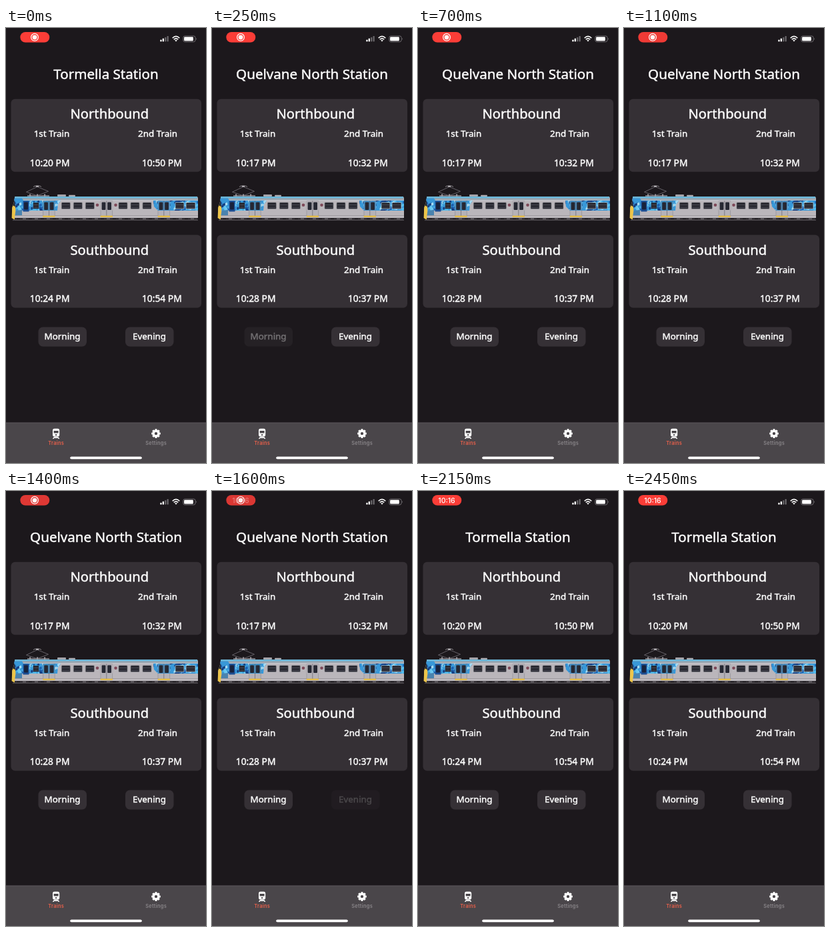
Write an HTML page that moves like this. It is 300 px wide and 648 px high and loops after 2500 ms.

```html
<!DOCTYPE html>
<html lang="en">
<head>
<meta charset="utf-8">
<title>Train times</title>
<style>
  html, body { margin: 0; width: 100%; height: 100%; overflow: hidden; background: #1c181c; }
  svg { display: block; width: 100%; height: 100%; }
  text {
    font-family: "Noto Sans", "Open Sans", sans-serif; font-weight: 500;
    fill: #fff; stroke: #fff; stroke-width: .42px; text-anchor: middle;
  }
  .ui { font-family: Inter, Roboto, sans-serif; font-weight: 600; stroke: none; }
  .title { font-size: 20.6px; }
  .head { font-size: 20.2px; }
  .label { font-size: 13.4px; }
  .time { font-size: 13.8px; }
  .tab { font-size: 7.4px; letter-spacing: .3px; }
</style>
</head>
<body>
<svg id="stage" viewBox="0 0 300 648" xmlns="http://www.w3.org/2000/svg"></svg>
<script>
const LOOP = 2500, STEP = 50;
const stops = [
  { name: "Tormella Station", times: ["10:20 PM", "10:50 PM", "10:24 PM", "10:54 PM"] },
  { name: "Quelvane North Station", times: ["10:17 PM", "10:32 PM", "10:28 PM", "10:37 PM"] }
];

const rect = (x, y, w, h, fill, r = 0, more = "") =>
  `<rect x="${x}" y="${y}" width="${w}" height="${h}" rx="${r}" fill="${fill}" ${more}/>`;
const text = (x, y, cls, str, more = "") =>
  `<text x="${x}" y="${y}" class="${cls}" ${more}>${str}</text>`;
const path = (d, fill, more = "") => `<path d="${d}" fill="${fill}" ${more}/>`;
const line = (d, color, w) => path(d, "none", `stroke="${color}" stroke-width="${w}"`);

function random(seed) {
  return () => (seed = (seed * 16807) % 2147483647) / 2147483647;
}

function statusBar() {
  let s = rect(21.3, 6, 44, 15.6, "#fb3d37", 7.8, 'id="pill"');
  s += `<g id="rec"><circle cx="43" cy="13.8" r="5.4" fill="none" stroke="#fff" stroke-width="1.2"/>
    <circle cx="43" cy="13.8" r="3.4" fill="#fff"/></g>`;
  s += text(43, 17.7, "ui", "10:16", 'id="clock" font-size="10.6" style="font-weight:500"');
  for (let i = 0; i < 4; i++) {
    const h = 2.8 + i * 1.8;
    s += rect(231.3 + i * 3.4, 20.2 - h, 2.3, h, i < 2 ? "#fff" : "#69666a", .6);
  }
  s += line("M249.7 15 Q255 9.9 260.3 15", "#fff", 1.7);
  s += line("M251.8 17.2 Q255 14.2 258.2 17.2", "#fff", 1.6);
  s += path("M253.2 18.5 Q255 16.9 256.8 18.5 L255 20.3Z", "#fff");
  s += rect(265.8, 11.9, 18.2, 8.7, "none", 2.5, 'stroke="#858286" stroke-width=".8"');
  s += rect(267.1, 13.2, 13.8, 6.1, "#fff", 1.4);
  return s + path("M285 14.7 q1.5 1.5 0 3Z", "#858286");
}

function card(y, head, id) {
  return rect(7.5, y, 285.5, 108.5, "#353035", 6)
    + text(155.3, y + 29.5, "head", head)
    + text(68.5, y + 56.3, "label", "1st Train")
    + text(227.5, y + 56.3, "label", "2nd Train")
    + text(65.6, y + 99.9, "time", "", `id="time${id}"`)
    + text(233.8, y + 99.9, "time", "", `id="time${id + 1}"`);
}

function button(x, label, id) {
  return `<g id="${id}">${rect(x, 445.5, 72.5, 29, "#353035", 7)}
    ${text(x + 36.1, 463.7, "label", label)}</g>`;
}

function pane(x, w, frame = "#85858c") {
  return rect(x, 259.9, w, 9.6, "#24242c", 1, `stroke="${frame}" stroke-width=".7"`)
    + rect(x + 1, 263, w - 2, .8, "#5b5c66")
    + rect(x + 1.2, 266.5, w - 2.4, 1.6, "#41414c");
}

function doors(x, top) {
  let s = rect(x, 257.5, 17.6, 22.5, "#b5b2b8", .5, 'stroke="#85838a" stroke-width=".5"');
  s += rect(x, 257.5, 17.6, 14.5, top);
  for (const dx of [1.6, 10.2]) s += rect(x + dx, 259.5, 5.8, 11.5, "#262833", 1);
  return s + rect(x + 8.5, 257.5, .7, 22.5, "#67656e") + rect(x - .3, 279.6, 18.2, 2.2, "#e8bd3f");
}

function livery(x0, x1, seed) {
  const rnd = random(seed), tones = ["#1d5fae", "#55bdec", "#a9dcf2", "#153f82", "#6cc9f1"];
  let s = "";
  for (let i = 0; i < 56; i++) {
    const x = x0 + rnd() * (x1 - x0), y = 256 + rnd() * 15, w = 2 + rnd() * 4;
    s += path(`M${x.toFixed(1)} ${y.toFixed(1)} l${w.toFixed(1)} -2 l1 3.4 l-${w.toFixed(1)} 2Z`,
      tones[i % tones.length]);
  }
  return s;
}

function train() {
  let s = "";
  // pantograph and roof boxes
  s += line("M47 236.5 L30.5 244.3 L49 250.5 M47 236.5 L63.5 243.3 L45 250.5", "#77737a", .8);
  s += line("M41 236.8 q1 -1.5 3 -1.5 h6 q2 0 3 1.5", "#8d898e", 1);
  s += rect(45, 234.8, 4, 2, "#bcb9bd") + rect(32, 249, 33, 2, "#77747a");
  for (const x of [35, 46, 57]) s += rect(x, 247.5, 2.2, 3.5, "#9a979d");
  s += rect(77, 248, 13, 3, "#a6a4aa", 1) + rect(94, 248.8, 10, 2.2, "#aeacb1", 1);
  // running gear
  s += rect(13, 282, 274, 4, "#302c31");
  for (let x = 16; x < 284; x += 9) s += rect(x, 283.6, 5, 1.4, x % 2 ? "#6b676d" : "#1d1a1e");
  s += rect(10, 285.7, 278, .8, "#777378");
  // body
  s += path("M14 251 H285 Q288 251 288 254 V282.6 H10 L9 270Z", "#bab6bb");
  s += path("M14 251 H285 Q287.5 251 287.8 256.5 H12.5Z", "#9aa5af");
  s += rect(13, 251.2, 274, 2.2, "#65b9de") + rect(12, 256.5, 276, .8, "#d6d5d9");
  s += rect(11, 279.2, 277, .8, "#99959c") + rect(11, 281.6, 277, 1, "#d2d0d4");
  s += `<clipPath id="ends"><path d="M12.5 253.5 H24 L26 257 H82 L78 263 L77 272 H11Z M221 257 H288 V272 H228 L222 266Z"/></clipPath>`;
  s += `<g clip-path="url(#ends)">${rect(10, 251, 280, 22, "#3898d8")}${livery(10, 84, 71)}${livery(219, 288, 937)}</g>`;
  s += path("M12.5 259 L9.3 267 L8.6 283 L12.8 285.5 L14.5 270Z", "#edc54a");
  s += path("M13 256 L10.4 264.5 L13.5 266Z", "#20242d");
  s += path("M14.5 272 L13.5 279 L24 279 V271Z", "#4a83ae");
  // windows and doors
  s += rect(25.5, 257.5, 9, 16, "#1d4d92", .5) + rect(27, 259.5, 6, 11, "#18233c", 1);
  s += pane(40.5, 9, "#3d9bd3");
  s += doors(55.6, "#3b91c9") + doors(142, "#b5b2b8") + doors(228, "#458fc6");
  for (const x of [83.3, 101.3, 119.3, 169, 187, 205]) s += pane(x, 13);
  s += pane(254, 13, "#b9def0") + pane(270, 14, "#b9def0");
  for (const x of [137, 164.5]) s += `<circle cx="${x}" cy="263.7" r="2.3" fill="#7d4858"/>`;
  return s;
}

function tabBar() {
  const bar = "#4a464a";
  let s = rect(0, 588, 300, 60, bar) + rect(0, 587.6, 300, .8, "#625e62");
  // train icon
  s += rect(70, 596.8, 10.2, 12, "#fff", 2.8) + rect(71.6, 600, 7, 3.4, bar, .5);
  s += `<circle cx="75.1" cy="606.1" r="1.2" fill="${bar}"/>`;
  s += path("M71.8 609.2 H78.4 L80.4 612 H78.6 L77.9 611 H72.3 L71.6 612 H69.8Z", "#fff");
  // gear
  for (let a = 0; a < 180; a += 45)
    s += rect(223.4, 597.3, 3.2, 13.6, "#fff", .8, `transform="rotate(${a} 225 604.1)"`);
  s += `<circle cx="225" cy="604.1" r="3.8" fill="none" stroke="#fff" stroke-width="3.4"/>`;
  s += `<circle cx="225" cy="604.1" r="2.2" fill="${bar}"/>`;
  s += text(75.2, 620.6, "ui tab", "Trains", 'style="fill:#e9604b"');
  s += text(225.1, 620.6, "ui tab", "Settings", 'style="fill:#8a868a"');
  return s + rect(96.2, 638.4, 107.6, 3.8, "#fff", 1.9);
}

document.getElementById("stage").innerHTML =
  rect(0, 0, 300, 648, "#1c181c") + statusBar()
  + text(150, 76, "title", "", 'id="title"')
  + card(105.7, "Northbound", 0) + train() + card(308.2, "Southbound", 2)
  + button(48.5, "Morning", "morning") + button(179, "Evening", "evening")
  + tabBar();

const el = id => document.getElementById(id);
const fade = (id, v) => el(id).setAttribute("opacity", v);
const clamp = v => Math.min(1, Math.max(0, v));
const ease = v => v < .5 ? 2 * v * v : 1 - 2 * (1 - v) * (1 - v);

// Opacity of a pressed button: quick dim, then slower return after release.
function press(t, down, up) {
  return t < up
    ? 1 - .8 * ease(clamp((t - down) / 150))
    : .2 + .8 * ease(clamp((t - up) / 250));
}

let shown = -1;
function draw(now) {
  const t = Math.floor((now % LOOP) / STEP) * STEP;
  const stop = t >= 165 && t < 1650 ? 1 : 0;
  if (stop !== shown) {
    shown = stop;
    el("title").textContent = stops[stop].name;
    stops[stop].times.forEach((v, i) => el("time" + i).textContent = v);
  }
  fade("morning", press(t, 10, 165));
  fade("evening", press(t, 1430, 1620));
  const swap = clamp((t - 1550) / 150);
  fade("rec", 1 - swap * swap);
  fade("clock", swap);
  // the pill dims slowly, then brightens with the clock
  const dim = t < 1600 ? ease(clamp((t - 700) / 900)) : 1 - ease(clamp((t - 1600) / 300));
  fade("pill", 1 - .14 * dim);
}

const start = performance.now();
function tick() {
  draw(performance.now() - start);
  requestAnimationFrame(tick);
}
tick();
</script>
</body>
</html>
```
